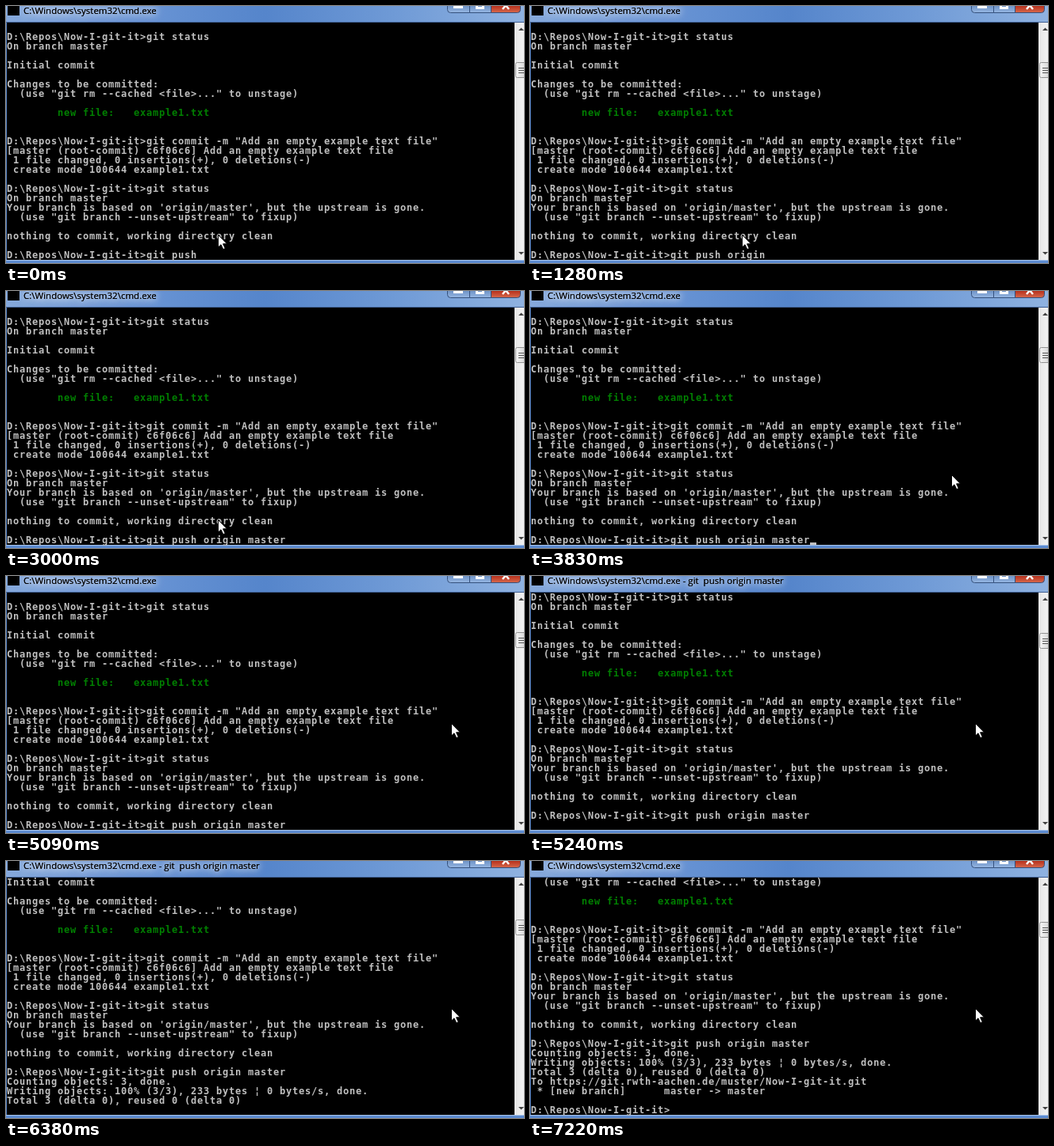
Animation of 653 by 325 pixels, one loop 8000 ms. Source, as an HTML page with a canvas:

```html
<!DOCTYPE html>
<html lang="en">
<head>
<meta charset="utf-8">
<title>git push</title>
<style>
html, body { margin: 0; width: 100%; height: 100%; overflow: hidden; background: #000; }
canvas { display: block; }
</style>
</head>
<body>
<canvas id="stage" width="653" height="325"></canvas>
<script>
const ctx = document.getElementById('stage').getContext('2d');
const LOOP = 8000, COL = 8, ROW = 12, LEFT = 1, TOP = 21, ROWS = 25, BOTTOM = TOP + ROWS * ROW;
const PROMPT = 'D:\\Repos\\Now-I-git-it>';
const COMMAND = 'git push origin master';
const TITLE = 'C:\\Windows\\system32\\cmd.exe';
const FRAME_BLUE = '#5c8bd0';

const lines = `
${PROMPT}git status
On branch master

Initial commit

Changes to be committed:
  (use "git rm --cached <file>..." to unstage)

        new file:   example1.txt


${PROMPT}git commit -m "Add an empty example text file"
[master (root-commit) c6f06c6] Add an empty example text file
 1 file changed, 0 insertions(+), 0 deletions(-)
 create mode 100644 example1.txt

${PROMPT}git status
On branch master
Your branch is based on 'origin/master', but the upstream is gone.
  (use "git branch --unset-upstream" to fixup)

nothing to commit, working directory clean

${PROMPT}${COMMAND}
Counting objects: 3, done.
Writing objects: 100% (3/3), 233 bytes \u00a6 0 bytes/s, done.
Total 3 (delta 0), reused 0 (delta 0)
To https://git.rwth-aachen.de/muster/Now-I-git-it.git
 * [new branch]      master -> master

${PROMPT}`.split('\n');

const clamp = (v, lo, hi) => Math.min(hi, Math.max(lo, v));

// Letters of a word typed at an even pace, first at start and last at end
const typed = (t, word, start, end) =>
  clamp(Math.floor((t - start) / (end - start) * (word.length - 1)) + 1, 0, word.length);

const caretOn = t => (t + 670) % 1050 < 500;

// One flick, then a slowing glide seen in steps of 145 ms
function pointerAt(t) {
  if (t < 3400) return [267, 289];
  const u = clamp(Math.floor((t - 3400) / 145) / 4, 0, 1);
  return [561 - 92 * (1 - u) ** 1.6, 277 - 91 * u * u * (3 - 2 * u)].map(Math.round);
}

function rect(color, x, y, w, h) {
  ctx.fillStyle = color;
  ctx.fillRect(x, y, w, h);
}

function polygon(points, fill, stroke) {
  ctx.beginPath();
  points.forEach(([x, y]) => ctx.lineTo(x, y));
  ctx.closePath();
  ctx.fillStyle = fill;
  ctx.fill();
  if (stroke) {
    ctx.strokeStyle = stroke;
    ctx.lineWidth = 1;
    ctx.stroke();
  }
}

function gradient(x0, y0, x1, y1, ...colors) {
  const g = ctx.createLinearGradient(x0, y0, x1, y1);
  colors.forEach((c, i) => g.addColorStop(i / (colors.length - 1), c));
  return g;
}

function roundBox(x, y, w, h, radii, fill, stroke) {
  ctx.beginPath();
  ctx.roundRect(x + .5, y + .5, w, h, radii);
  ctx.fillStyle = fill;
  ctx.fill();
  ctx.strokeStyle = stroke;
  ctx.lineWidth = 1;
  ctx.stroke();
}

function captionButton(x, w, top, bottom, radii) {
  roundBox(x, -9, w, 17, radii, gradient(0, 0, 0, 8, top, bottom), '#34507c');
}

function drawTitleBar(text) {
  rect(gradient(0, 0, 653, 0, '#86a9dc', '#6a95d5', '#5585cb', '#6f9ad6', '#8fb2e0'), 0, 0, 653, 20);
  rect('#3f5f92', 0, 20, 653, 1);
  rect('#000', 2, 0, 15, 12);

  ctx.font = '11.5px "Open Sans", "Noto Sans", sans-serif';
  ctx.fillStyle = '#000';
  ctx.shadowColor = '#fff';
  ctx.shadowBlur = 10;
  for (let pass = 0; pass < 2; pass++) ctx.fillText(text, 22, 9.5);
  ctx.shadowBlur = 0;

  captionButton(556, 28, '#6f94c8', '#93b4e0', [0, 0, 0, 4]);
  captionButton(584, 27, '#6f94c8', '#93b4e0', 0);
  captionButton(611, 37, '#b8301c', '#d4664a', [0, 0, 4, 0]);
  rect('#fff', 564, 0, 12, 3);
  rect('#fff', 592, 0, 11, 4);
  rect('#6f94c8', 595, 0, 5, 1);
  ctx.strokeStyle = '#fff';
  ctx.lineWidth = 2.5;
  ctx.beginPath();
  for (const side of [-1, 1]) {
    ctx.moveTo(630 - side, -2);
    ctx.lineTo(630 + 4 * side, 4);
  }
  ctx.stroke();
}

function drawScrollbar(thumb) {
  rect(gradient(641, 0, 653, 0, '#e6e6e6', '#f2f2f2'), 641, TOP, 12, BOTTOM - TOP);
  polygon([[646, 31], [649.5, 27.5], [653, 31]], '#404040');
  polygon([[646, 311], [653, 311], [649.5, 314.5]], '#404040');
  roundBox(642, thumb - 1, 15, 19, 2, gradient(642, 0, 657, 0, '#f6f6f6', '#d2d2d2'), '#929292');
  for (let i = 0; i < 3; i++) rect('#555', 646, thumb + 6 + i * 3, 7, 1);
}

function drawLine(text, row) {
  ctx.fillStyle = text.includes('new file:') ? '#008000' : '#c0c0c0';
  [...text].forEach((ch, i) => ctx.fillText(ch, LEFT + i * COL, TOP + row * ROW + 10));
}

function drawPointer(x, y) {
  const shape = [[.5, .5], [.5, 16], [4, 12.8], [6.8, 18.7], [9.3, 17.6], [6.6, 11.8], [11.5, 11.8]];
  polygon(shape.map(([dx, dy]) => [x + dx, y + dy]), '#fff', '#000');
}

function draw(t) {
  const scroll = (t >= 5240) + 3 * (t >= 6380) + 3 * (t >= 7220);
  const running = t >= 5240 && t < 7220;
  const untyped = 14 - typed(t, ' origin', 310, 860) - typed(t, ' master', 1410, 2410);

  rect(FRAME_BLUE, 0, 0, 653, 325);
  rect('#a9c4ea', 0, BOTTOM, 653, 1);
  rect('#000', LEFT, TOP, 640, BOTTOM - TOP);
  drawTitleBar(TITLE + (running ? ' - git  push origin master' : ''));

  ctx.font = 'bold 12px "DejaVu Sans Mono", "Liberation Mono", monospace';
  const visible = lines.slice(scroll, scroll + ROWS);
  if (running) visible[ROWS - 1] = '';
  let last = visible[ROWS - 1];
  last = visible[ROWS - 1] = last.slice(0, last.length - untyped);
  visible.forEach(drawLine);
  if (caretOn(t) && t < 6380) rect('#c0c0c0', LEFT + last.length * COL, BOTTOM - 3, COL, 3);

  drawScrollbar(Math.round(72 + scroll * .8));
  drawPointer(...pointerAt(t));
}

function frame() {
  draw(performance.now() % LOOP);
  requestAnimationFrame(frame);
}
frame();
</script>
</body>
</html>
```
